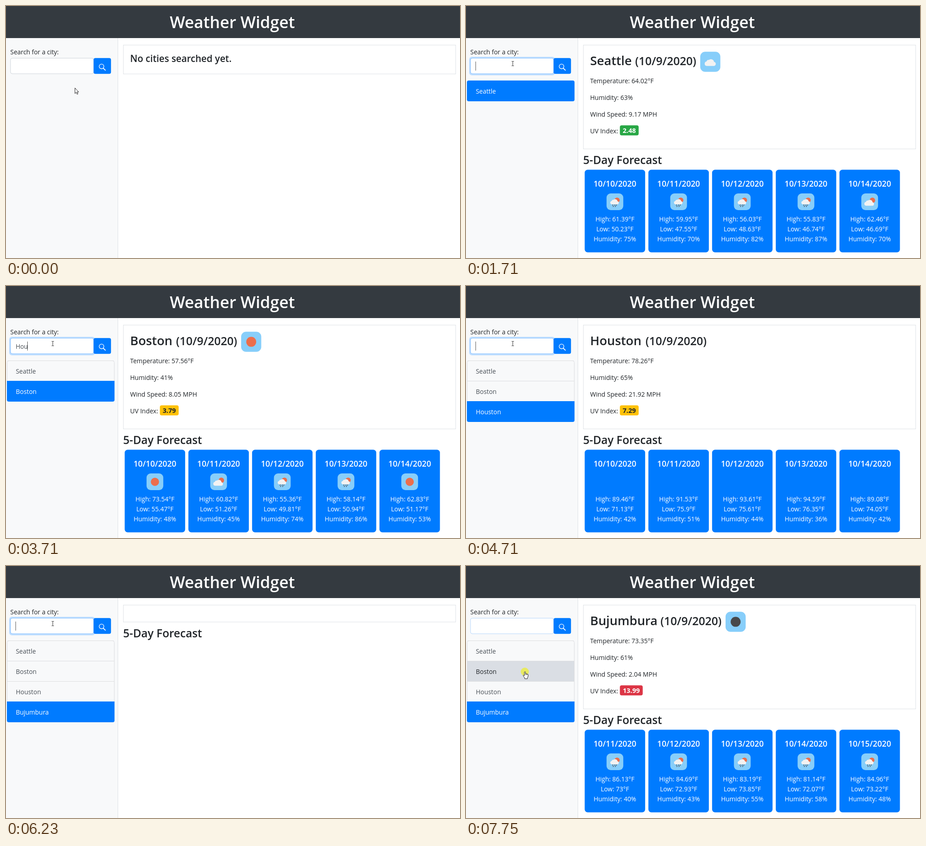
An HTML page for the animation above (8000 ms loop, 1004 px wide and 558 px high).

```html
<!DOCTYPE html>
<html lang="en">
<head>
<meta charset="utf-8">
<title>Weather Widget</title>
<style>
  html, body { margin: 0; width: 100%; height: 100%; overflow: hidden; background: #fff; }
  svg { display: block; width: 100%; height: 100%; font-family: "Open Sans", "Noto Sans", sans-serif; }
</style>
</head>
<body>
<svg id="stage" viewBox="0 0 1004 558"></svg>
<script>
const LOOP = 8000;
const BLUE = '#007bff', DARK = '#212529', GREY = '#495057', LINE = '#dee2e6';
const BODY = 13.95;
const stage = document.getElementById('stage');

// Each report: heading positions, current weather, and cards of [icon, high, low, humidity].
const reports = [
  { city: 'Seattle', dateX: 375, icon: 'cloud', temp: '64.02', humidity: 63, wind: '9.17', uv: '2.48', firstDay: 10,
    cards: [['rain', '61.39', '50.23', 75], ['rain', '59.95', '47.55', 70], ['rain', '56.03', '48.63', 82],
            ['rain', '55.83', '46.74', 87], ['few', '62.46', '46.69', 70]] },
  { city: 'Boston', dateX: 377, icon: 'sun', temp: '57.56', humidity: 41, wind: '8.05', uv: '3.79', firstDay: 10,
    cards: [['sun', '73.54', '55.47', 48], ['few', '60.82', '51.26', 45], ['rain', '55.36', '49.81', 74],
            ['rain', '58.14', '50.94', 86], ['sun', '62.83', '51.17', 53]] },
  { city: 'Houston', dateX: 398, icon: 'broken', temp: '78.26', humidity: 65, wind: '21.92', uv: '7.29', firstDay: 10,
    cards: [['sun', '89.46', '71.13', 42], ['sun', '91.53', '75.9', 51], ['sun', '93.61', '75.61', 44],
            ['sun', '94.59', '76.35', 36], ['sun', '89.08', '74.05', 42]] },
  { city: 'Bujumbura', dateX: 431, icon: 'night', temp: '73.35', humidity: 61, wind: '2.04', uv: '13.99', firstDay: 11,
    cards: [['rain', '86.13', '73', 40], ['rain', '84.69', '72.93', 43], ['rain', '83.19', '73.85', 55],
            ['rain', '81.14', '72.07', 58], ['rain', '84.96', '73.22', 48]] },
];

// Changes accumulate from one step to the next. firstIcon: index of the first card icon loaded.
const timeline = [
  [0, { listed: 0, view: 'none', firstIcon: 0, headIcon: true, typed: '', caret: false, focus: 'off', pointer: 'arrow', hover: -1 }],
  [250, { pointer: 'beam', focus: 'on', caret: true }],
  [480, { typed: 'Se' }],
  [730, { typed: 'Sea' }],
  [980, { typed: 'Seatt' }],
  [1230, { typed: 'Seattle' }],
  [1710, { typed: '', listed: 1, view: 'report' }],
  [2210, { typed: 'B' }],
  [2460, { typed: 'Bost' }],
  [2710, { typed: 'Boston' }],
  [2960, { typed: '', listed: 2, view: 'empty' }],
  [3210, { view: 'report', firstIcon: 1 }],
  [3460, { firstIcon: 0, typed: 'H' }],
  [3710, { typed: 'Hou' }],
  [3960, { typed: 'Houst' }],
  [4210, { typed: 'Houston' }],
  [4710, { typed: '', listed: 3, firstIcon: 5, headIcon: false }],
  [4960, { firstIcon: 0, headIcon: true }],
  [5210, { typed: 'Bu' }],
  [5480, { typed: 'Buju' }],
  [5730, { typed: 'Bujumb' }],
  [5980, { typed: 'Bujumbura' }],
  [6230, { typed: '', listed: 4, view: 'empty' }],
  [6710, { view: 'report', caret: false }],
  [7210, { pointer: 'hand', hover: 1 }],
  [7480, { caret: true }],
  [7750, { caret: false, focus: 'fading', pointer: 'press' }],
];

const text = (x, y, str, size = BODY, fill = DARK, weight = 400, anchor = 'start') =>
  `<text x="${x}" y="${y}" font-size="${size}" fill="${fill}" font-weight="${weight}" text-anchor="${anchor}">${str}</text>`;
const rect = (x, y, w, h, fill, rx = 0, stroke = 'none') =>
  `<rect x="${x}" y="${y}" width="${w}" height="${h}" fill="${fill}" rx="${rx}" stroke="${stroke}"/>`;
const circle = (x, y, r, fill) => `<circle cx="${x}" cy="${y}" r="${r}" fill="${fill}"/>`;
const path = (d, fill, rest = '') => `<path d="${d}" fill="${fill}" ${rest}/>`;
const cloud = (x, y, scale = 1, fill = '#f2f2f2') =>
  path('M5 17a5 5 0 0 1-.3-9.9a4 4 0 0 1 5-3.3a7 7 0 0 1 11.6 4.2a4.6 4.6 0 0 1 .2 9z', fill,
    `transform="translate(${x} ${y}) scale(${scale})"`);

const ORANGE = '#ec6e4c', CHARCOAL = '#48484a';
const icons = {
  cloud: cloud(9.3, 14.5),
  sun: circle(22.3, 22.4, 11, ORANGE),
  night: circle(22.3, 22.4, 11, CHARCOAL),
  few: circle(29.5, 18.5, 7.3, ORANGE) + cloud(7.5, 15, 1.05),
  broken: cloud(18.5, 11.5, .76, CHARCOAL) + cloud(7.5, 15, 1.05),
  rain: circle(28, 18, 7, ORANGE) + cloud(9.5, 13.5, .92) +
    path('M17 30l-1 2M22.5 30l-1 2M27 30l-1 2M18.5 33.5l-1 2M24 33.5l-1 2', 'none',
      `stroke="${CHARCOAL}" stroke-width="1.5" stroke-linecap="round"`),
};
const icon = (name, x, y, size) =>
  `<g transform="translate(${x} ${y}) scale(${size / 44.5})">${rect(0, 0, 44.5, 44.5, '#87cefa', 11)}${icons[name]}</g>`;

const pointers = {
  arrow: path('M152.5 181.5v12.3l2.8-2.6 2 4.3 1.9-.9-2-4.2h3.5z', '#fff', 'stroke="#222"'),
  beam: path('M101 122.5h2l.5.5.5-.5h2M103.5 123v9M101 132.5h2l.5-.5.5.5h2', 'none', 'stroke="#333"'),
  hand: path('M129.2 243v-8.3q1.3-1.6 2.5 0v3.8l4.5 1q1.5.4 1.4 2l-.8 4.5-1 1.7v2h-6v-2l-3.3-4.5q-.3-1.6 1.2-1.5z', '#fff',
    'stroke="#222" stroke-linejoin="round"') + path('M131.7 238.5v3M133.7 239v2.5M135.7 239.6v2', 'none', 'stroke="#222" stroke-width=".7"'),
};
pointers.press = circle(130, 234, 9, '#e8ea62') + pointers.hand;

function searchBox({ typed, caret, focus }) {
  const border = { off: '#ced4da', on: '#80bdff', fading: '#b5d6fb' }[focus];
  return text(9.5, 106.5, 'Search for a city:') +
    (focus === 'on' ? rect(7, 112.5, 190, 41, '#bfdeff', 6) : '') +
    rect(10, 115.5, 184, 34.5, '#fff', 4, border) +
    rect(193.7, 115.2, 38.5, 35, BLUE, 4) +
    '<g fill="none" stroke="#fff" stroke-width="1.3"><circle cx="211.3" cy="133.8" r="5.2"/><path d="M215 137.6l4.6 4.6" stroke-width="1.9" stroke-linecap="round"/></g>' +
    `<text id="typed" x="21.5" y="139" font-size="13.7" fill="${GREY}">${typed}</text>` +
    (caret ? rect(21, 123, 1, 20, '#555').replace('<rect', '<rect id="caret"') : '');
}

function cityList({ listed, hover }) {
  if (!listed) return '';
  const rowY = i => Math.round(165 + 45.15 * i);
  const last = listed - 1;
  const row = ({ city }, i) => {
    const [fill, ink] = i === last ? [BLUE, '#fff'] : i === hover ? ['#dadee4', DARK] : ['#f8f9fa', GREY];
    return rect(2, rowY(i), 238, 46, fill) +
      (i < last ? rect(2, rowY(i), 238, 1, '#dcdddf') : '') +
      text(21.7, rowY(i) + 29, city, BODY, ink);
  };
  const outline = last ? rect(2.5, 165.5, 237, rowY(last) - 161, 'none', 4, '#dcdddf') : '';
  const rows = reports.slice(0, listed).map(row);
  return `<clipPath id="round">${rect(2, 165, 238, rowY(last) - 119, '#000', 4)}</clipPath>` +
    `<g clip-path="url(#round)">${rows.slice(0, last).join('')}${outline}${rows[last]}</g>`;
}

function uvBadge(uv) {
  const [fill, ink] = uv < 3 ? ['#28a745', '#fff'] : uv < 8 ? ['#ffc107', DARK] : ['#dc3545', '#fff'];
  const width = uv.length > 4 ? 50.5 : 41.5;
  return rect(340.3, 264.3, width, 22.3, fill, 4) + text(340.3 + width / 2, 281, uv, 14.7, ink, 700, 'middle');
}

function card([name, high, low, humidity], i, day, showIcon) {
  const x = 262.5 + 140.85 * i, mid = x + 66.8;
  const line = (y, str) => text(mid, y, str, BODY, '#fff', 500, 'middle');
  return rect(x, 362.5, 133.7, 183, BLUE, 6.5) +
    text(mid, 400.3, `10/${day}/2020`, 17.7, '#fff', 600, 'middle') +
    (showIcon ? icon(name, mid - 18.5, 415, 37) : '') +
    line(476.5, `High: ${high}°F`) + line(499, `Low: ${low}°F`) + line(521.2, `Humidity: ${humidity}%`);
}

function mainPanel({ view, listed, firstIcon, headIcon }) {
  const frame = height => rect(259.5, 86.5, 735, height, '#fff', 0, LINE);
  const forecast = y => text(259, y, '5-Day Forecast', 24.6, DARK, 600);
  if (view === 'none') return frame(64) + text(274.5, 123.6, 'No cities searched yet.', 20.7, DARK, 600);
  if (view === 'empty') return frame(37.5) + forecast(157.5);
  const r = reports[listed - 1];
  const details = [`Temperature: ${r.temp}°F`, `Humidity: ${r.humidity}%`, `Wind Speed: ${r.wind} MPH`, 'UV Index:'];
  return frame(230) +
    text(274.5, 130.8, r.city, 27.5, DARK, 600) +
    text(r.dateX - 1, 130.8, '(10/9/2020)', 25, DARK, 600) +
    (headIcon ? icon(r.icon, r.dateX + 143, 101.2, 44.5) : '') +
    details.map((str, i) => text(274.5, 170.5 + 37 * i, str, 14)).join('') +
    uvBadge(r.uv) + forecast(350) +
    r.cards.map((c, i) => card(c, i, r.firstDay + i, i >= firstIcon)).join('');
}

function render(state) {
  stage.innerHTML = rect(0, 0, 1004, 558, '#fff') +
    rect(0, 71, 247, 487, '#f8f9fa') + rect(247, 71, 1, 487, LINE) +
    rect(0, 0, 1004, 71, '#343a40') +
    text(500.5, 48.8, 'Weather Widget', 35.7, '#fff', 600, 'middle') +
    searchBox(state) + cityList(state) + mainPanel(state) + pointers[state.pointer];
  const caret = document.getElementById('caret');
  if (caret && state.typed) {
    caret.setAttribute('x', Math.floor(21 + document.getElementById('typed').getComputedTextLength()));
  }
}

let shown = -1;
function tick() {
  const t = performance.now() % LOOP;
  const step = timeline.filter(([start]) => start <= t).length;
  if (step !== shown) {
    shown = step;
    render(Object.assign({}, ...timeline.slice(0, step).map(([, change]) => change)));
  }
  requestAnimationFrame(tick);
}
tick();
</script>
</body>
</html>
```
